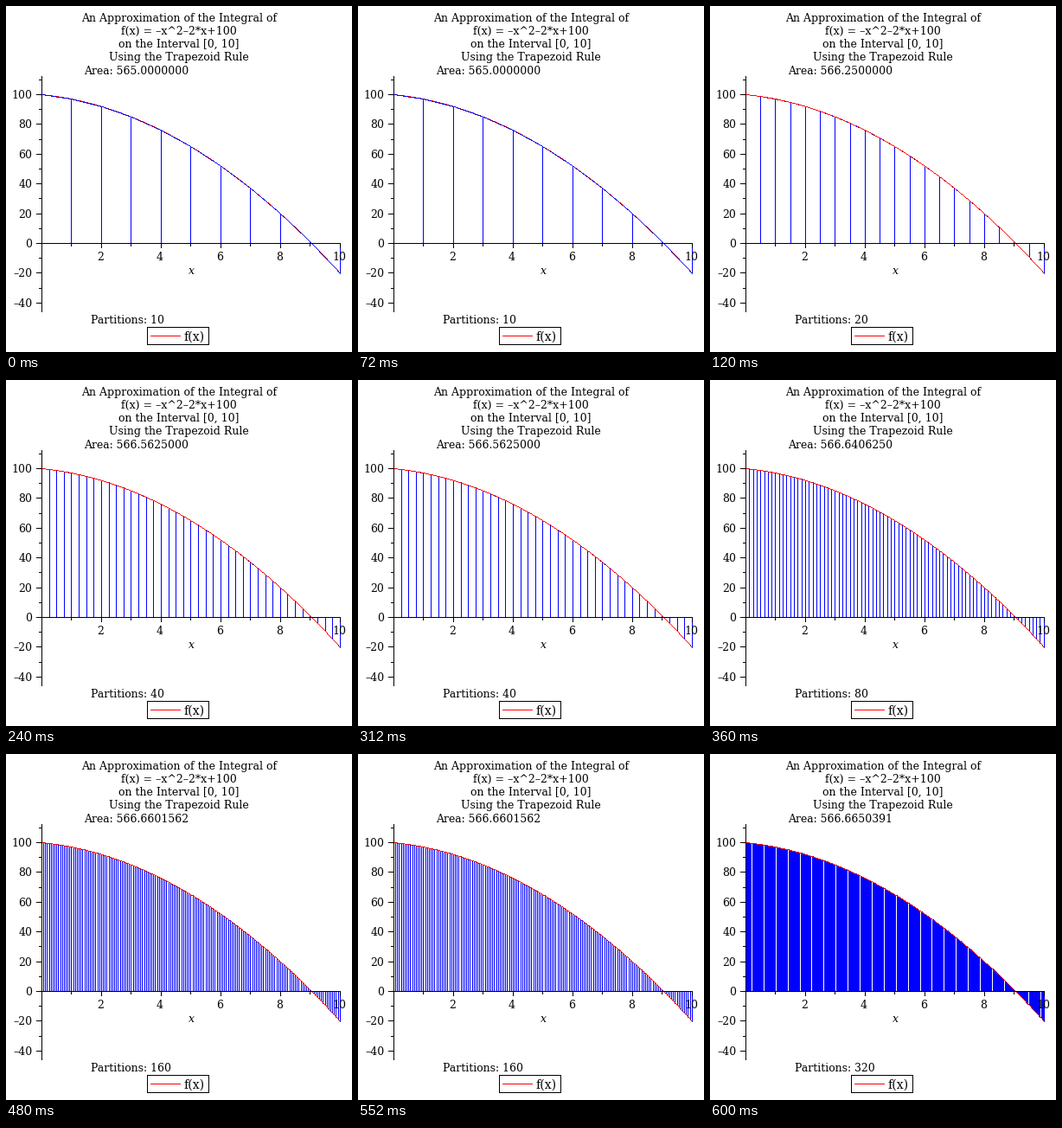
A matplotlib script that plays this animation: 400 px wide and 400 px high, repeating every 0.72 s.

```python
import numpy as np
import matplotlib.pyplot as plt
from matplotlib.animation import FuncAnimation
from matplotlib.collections import LineCollection
from matplotlib.patches import Rectangle

PX = 0.72  # points per pixel at 100 dpi
LEFT, BASE = 41, 274
X_SCALE, Y_SCALE = 34.48, 1.72
SIZE = 12.4

plt.rcParams["font.family"] = "DejaVu Serif"
fig = plt.figure(figsize=(4, 4), dpi=100, facecolor="white")
ax = fig.add_axes([0, 0, 1, 1])
ax.set(xlim=(0, 400), ylim=(400, 0))
ax.axis("off")


def f(x):
    return -x**2 - 2 * x + 100


def col(x):
    return np.floor(LEFT + 0.5 + X_SCALE * np.asarray(x))


def row(y):
    return np.floor(BASE + 0.5 - Y_SCALE * np.asarray(y))


def label(x, y, text, size=SIZE, **kw):
    return ax.text(x, y, text, fontsize=size * PX, va="baseline", zorder=6, **kw)


def pixel_lines(color, zorder, segments=()):
    lines = LineCollection(segments, colors=color, linewidths=PX,
                           antialiaseds=False, zorder=zorder)
    lines.set_snap(False)
    return ax.add_collection(lines, autolim=False)


def vertical(x, top, bottom):
    """One-pixel columns covering rows top to bottom inclusive."""
    return [[(a + 0.5, b), (a + 0.5, c + 1)] for a, b, c in zip(x, top, bottom)]


def horizontal(y, left, right):
    return [[(left, y + 0.5), (right + 1, y + 0.5)]]


def trace(values):
    rows = row(values)
    ends = np.maximum(rows, np.append(rows[1:], rows[-1]) - 1)
    return vertical(columns, rows, ends)


def draw_axes():
    segments = vertical([LEFT], [81], [353]) + horizontal(BASE, LEFT, 386)
    for y in range(-40, 111, 10):
        major = y % 20 == 0
        segments += horizontal(row(y), LEFT - (6 if major else 3), LEFT)
        if major and y <= 100:
            label(30.5, row(y) + 5, str(y).replace("-", "–"), ha="right")
    for x in range(1, 11):
        major = x % 2 == 0
        segments += vertical([col(x)], [BASE], [BASE + (5 if major else 3)])
        if major:
            label(col(x) - 1, 294, str(x), ha="center")
    pixel_lines("black", 5, segments)
    label(214, 310, "x", style="italic", ha="center")


def draw_legend():
    ax.add_patch(Rectangle((163.5, 371.5), 71, 20, fill=False, ec="black",
                           lw=PX, antialiased=False, snap=False))
    pixel_lines("red", 5, horizontal(381, 167, 201))
    label(205.5, 387, "f(x)", size=14)


draw_axes()
draw_legend()
for i, line in enumerate(["An Approximation of the Integral of",
                          "f(x) = –x^2–2*x+100",
                          "on the Interval [0, 10]",
                          "Using the Trapezoid Rule"]):
    label(200, 18 + 15 * i, line, size=12.5, ha="center")
area_text = label(90.5, 79, "")
count_text = label(98, 367, "")

columns = np.arange(LEFT, 387)
xs = (columns - LEFT) / X_SCALE
pixel_lines("red", 3, trace(f(xs)))
traps = pixel_lines("blue", 2)


def draw(frame):
    n = 10 * 2**frame
    nodes = np.linspace(0, 10, n + 1)
    heights = f(nodes)
    area = 10 / n * (heights.sum() - (heights[0] + heights[-1]) / 2)
    area_text.set_text(f"Area: {area:.7f}")
    count_text.set_text(f"Partitions: {n}")

    rows = row(heights)
    traps.set_segments(
        vertical(col(nodes), np.minimum(rows, BASE), np.maximum(rows, BASE))
        + trace(np.interp(xs, nodes, heights)))
    # Coarse chords cover the curve; finer ones lie beneath it.
    traps.set_zorder(4 if n == 10 else 2)
    return traps, area_text, count_text


anim = FuncAnimation(fig, draw, frames=6, interval=120, repeat=True,
                     repeat_delay=0, blit=False)
plt.show()
```
